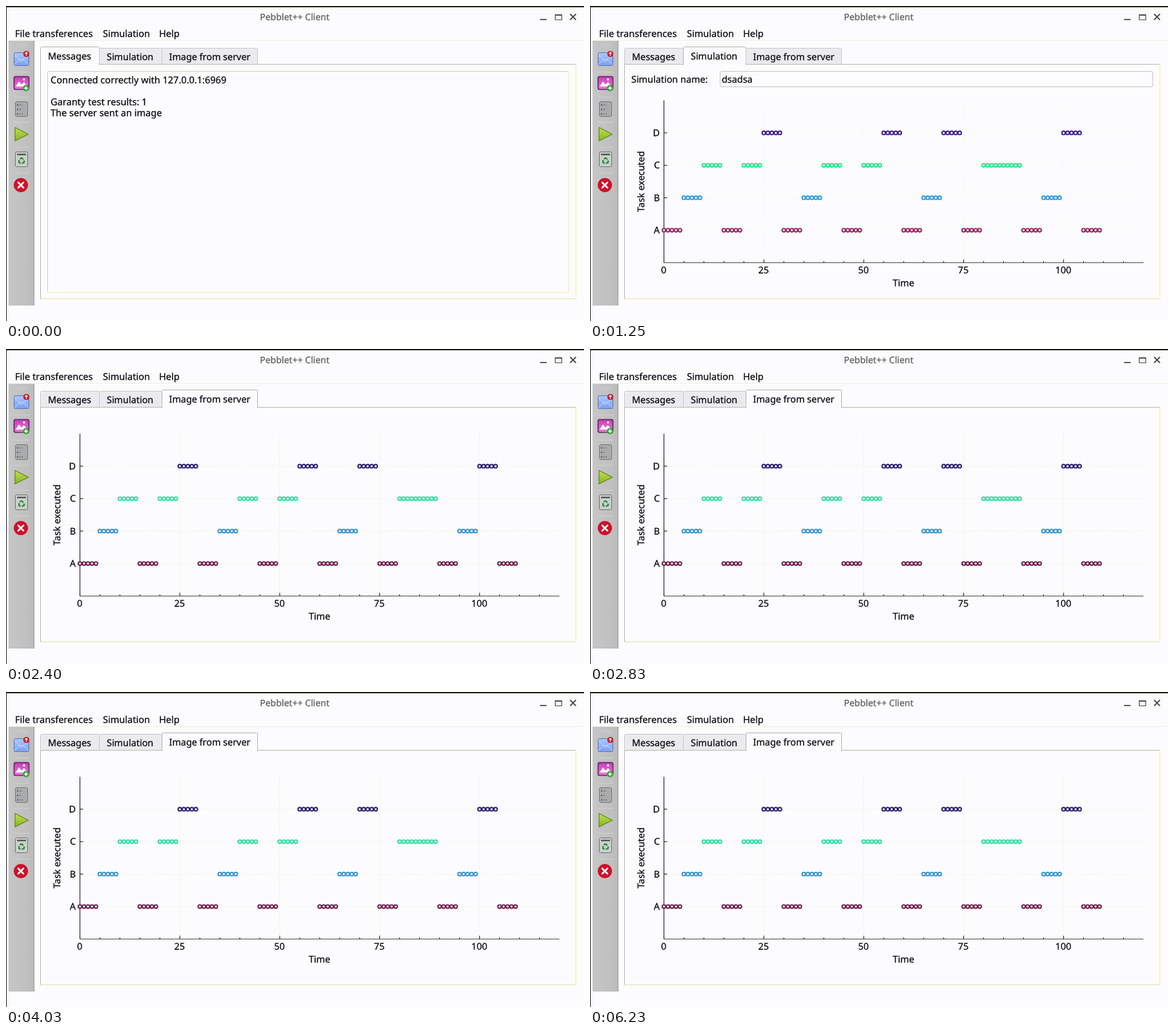
Recreate the animation shown at these times as an HTML page. Size 895 by 489 pixels, loop 6430 ms.

```html
<!DOCTYPE html>
<html lang="en">
<head>
<meta charset="utf-8">
<title>Client window</title>
<style>
  html, body { margin: 0; width: 100%; height: 100%; overflow: hidden; background: #fcfcfe; }
  svg { display: block; width: 895px; height: 489px; }
  text {
    font: 14.4px "Noto Sans", "Open Sans", sans-serif;
    fill: #08080a; stroke: #08080a; stroke-width: .25px;
    text-rendering: geometricPrecision;
  }
  .wide text { font-size: 14.55px; }
  .title { font-size: 14px; fill: #5c5c58; stroke: #5c5c58; }
  .page { display: none; }
  .page.on { display: inline; }
</style>
</head>
<body>
<svg id="stage" viewBox="0 0 895 489">
  <defs>
    <linearGradient id="bar">
      <stop offset="0" stop-color="#c6c6c8"/>
      <stop offset=".7" stop-color="#c0c0c0"/>
      <stop offset="1" stop-color="#bababa"/>
    </linearGradient>
    <linearGradient id="mail" x2="0" y2="1">
      <stop offset="0" stop-color="#a9c8fb"/>
      <stop offset="1" stop-color="#7d9ff0"/>
    </linearGradient>
    <linearGradient id="play" x2="0" y2="1">
      <stop offset="0" stop-color="#c3e052"/>
      <stop offset="1" stop-color="#83b51c"/>
    </linearGradient>
    <linearGradient id="photo" x2="0" y2="1">
      <stop offset="0" stop-color="#c43fb4"/>
      <stop offset="1" stop-color="#f07ad8"/>
    </linearGradient>
  </defs>

  <rect width="895" height="489" fill="#fcfcfe"/>
  <path d="M0 0H895V2H1V489H0Z" fill="#1e1e14"/>

  <!-- title bar and menu -->
  <text class="title" x="447" y="22" text-anchor="middle">Pebblet++ Client</text>
  <g fill="none" stroke="#4c4c48" stroke-width="1.8">
    <path d="M827 21H837"/>
    <path d="M850.5 13.5H860.5V21.5H850.5Z" stroke-width="1.2"/>
    <path d="M850 14H861" stroke-width="2"/>
    <path d="M873.5 12.5L882.5 21.5M882.5 12.5L873.5 21.5"/>
  </g>
  <g class="wide">
    <text x="14" y="48">File transferences</text>
    <text x="150" y="48">Simulation</text>
    <text x="237" y="48">Help</text>
  </g>
  <path d="M4 53.5H892" stroke="#f0f0dc"/>

  <!-- toolbar -->
  <rect x="4" y="54" width="40" height="411" fill="url(#bar)"/>
  <path d="M43.5 54V465" stroke="#9c9c96"/>
  <path d="M17 59.5H34M17 62.5H34" stroke="#e6e6e6" stroke-dasharray="1 2"/>
  <path d="M12 102.5H36M12 141.5H36M12 180.5H36M12 219.5H36M12 259.5H36" stroke="#d2d2d0"/>

  <g stroke-linejoin="round">
    <rect x="12.5" y="72.5" width="23" height="20" rx="2" fill="url(#mail)" stroke="#5676bd"/>
    <path d="M13 91L21 83H27L35 91M13 76L24 86L35 76" fill="none" stroke="#c3d8fd"/>
    <circle cx="31.5" cy="74.5" r="4.8" fill="#d21a2c"/>
    <path d="M31.5 77.5V72M29.5 74L31.5 71.8L33.5 74" fill="none" stroke="#fff" stroke-width="1.2"/>

    <rect x="12.5" y="109.5" width="23" height="20" rx="2.5" fill="url(#photo)" stroke="#662068" stroke-width="1.6"/>
    <path d="M15 125L20 117L24 122L28 118L33 125Z" fill="#fff"/>
    <circle cx="28" cy="114" r="1.8" fill="#fff"/>
    <circle cx="31" cy="127.5" r="5" fill="#39a23c"/>
    <path d="M28 127.5H34M31 124.5V130.5" stroke="#fff" stroke-width="1.6"/>

    <rect x="14.5" y="148.5" width="19" height="23" rx="2.5" fill="#a9aaac" stroke="#747674"/>
    <path d="M17 153.5H19M17 160.5H19M17 167.5H19" stroke="#3c3e42" stroke-width="1.6"/>
    <path d="M21 153.5H25M21 160.5H24M21 167.5H26" stroke="#5c5e66" stroke-dasharray="2 1"/>

    <path d="M14 188.5L34.5 199L14 209.5Z" fill="url(#play)" stroke="#5d841a" stroke-width="1.2"/>

    <rect x="14.5" y="226.5" width="19" height="23" rx="2" fill="#c9cfcb" stroke="#6c726e"/>
    <path d="M17 230.5H31" stroke="#3c423e" stroke-width="2"/>
    <g id="recycle" fill="none" stroke="#218a36" stroke-width="2.2"></g>

    <circle cx="23" cy="278" r="11" fill="#cf1029"/>
    <path d="M19 274L27 282M27 274L19 282" stroke="#fff" stroke-width="2.6" stroke-linecap="round"/>
  </g>

  <!-- tab pane -->
  <path d="M53.5 455V90.5" stroke="#b4b4ac"/>
  <path d="M53.5 90.5H882.5" stroke="#b9b9ae"/>
  <path d="M882.5 90.5V455" stroke="#ececae"/>
  <path d="M53.5 454.5H882.5" stroke="#e2e2b4"/>
  <g id="tabs"></g>

  <g class="page wide">
    <rect x="64.5" y="101.5" width="807" height="343" rx="1" fill="#fcfcfe" stroke="#eeeea8"/>
    <path d="M64.5 102V444M65 101.5H871" stroke="#cfcfb4"/>
    <text x="69" y="120">Connected correctly with 127.0.0.1:6969</text>
    <text x="69" y="154">Garanty test results: 1</text>
    <text x="69" y="171">The server sent an image</text>
  </g>
  <g class="page">
    <text x="64" y="119">Simulation name:</text>
    <rect x="201.5" y="101.5" width="670" height="24" rx="2.5" fill="#fcfcfe" stroke="#c6c6bc"/>
    <text x="204" y="119">dsadsa</text>
    <g id="live"></g>
  </g>
  <g class="page"><g id="still"></g></g>
</svg>

<script>
const $ = id => document.getElementById(id);
const LOOP = 6430;
const STEPS = [[0, 0], [1130, 1], [2400, 2]]; // start time, open tab
const RUNS = "ABCACDABCACDABDACCABDA";        // task run in each 5-unit slot
const TABS = [
  { name: "Messages", x: 53.5, end: 144.5, text: 65 },
  { name: "Simulation", x: 144.5, end: 241.5, text: 156 },
  { name: "Image from server", x: 241.5, end: 389.5, text: 252.5 }
];

const px = t => 114.5 + t * 6.188;
const line = (x1, y1, x2, y2, more = "") =>
  `<path d="M${x1} ${y1}L${x2} ${y2}" ${more}/>`;
const label = (x, y, s, anchor = "middle", more = "") =>
  `<text x="${x}" y="${y}" text-anchor="${anchor}" ${more}>${s}</text>`;

function plot(top, inks, grid) {
  const base = top + 252;
  const rowY = row => base - 50.4 * (row + 1);
  const dots = `stroke="${grid}" stroke-dasharray="1 2"`;
  const axis = 'stroke="#1c1c1c" stroke-width="1.1"';
  let out = "";

  for (let t = 25; t <= 100; t += 25) out += line(px(t), top, px(t), base, dots);
  for (let row = 0; row < 4; row++) out += line(px(0), rowY(row), px(120), rowY(row), dots);

  out += line(px(0), top, px(0), base, axis);
  out += line(px(0), base, px(120), base, 'stroke="#4a4a42"');
  for (let t = 0; t <= 115; t += 5) {
    const major = t % 25 === 0;
    out += line(px(t), base, px(t), base - (major ? 5 : 2.5), axis);
    if (major) out += label(px(t) - .5, base + 16.5, t);
  }
  for (let row = 0; row < 4; row++) {
    out += line(px(0), rowY(row), px(0) + 5, rowY(row), axis);
    out += label(108, rowY(row) + 5, "ABCD"[row], "end");
  }
  out += label(485.5, base + 36.5, "Time");
  out += label(0, 0, "Task executed", "middle", `transform="translate(84 ${top + 126}) rotate(-90)"`);

  [...RUNS].forEach((task, slot) => {
    const row = "ABCD".indexOf(task);
    for (let i = 0; i < 5; i++)
      out += `<circle cx="${px(slot * 5 + i)}" cy="${rowY(row)}" r="2.7" fill="#f4f2f8" stroke="${inks[row]}" stroke-width="1.9"/>`;
  });
  return out;
}

function drawTabs(open) {
  $("tabs").innerHTML = TABS.map((tab, i) => {
    const on = i === open;
    const y = on ? 63.5 : 65.5;
    const foot = on ? 91.5 : 90.5;
    const shape = `M${tab.x} ${foot}V${y + 2}Q${tab.x} ${y} ${tab.x + 2} ${y}H${tab.end - 2}Q${tab.end} ${y} ${tab.end} ${y + 2}V${foot}`;
    return `<path d="${shape}" fill="${on ? "#fcfcfe" : "#ebebef"}" stroke="${on ? "#b4b4a8" : "#c8c8c0"}"/>` +
      (on ? "" : line(tab.x, 90.5, tab.end, 90.5, 'stroke="#b9b9ae"')) +
      label(tab.text, on ? 83 : 84, tab.name, "start");
  }).join("");
}

$("recycle").innerHTML = [0, 120, 240].map(a =>
  `<path d="M-2.6 -3.2L0 -4.6L3 -2.4" transform="translate(24 240.5) rotate(${a})"/>`).join("");
$("live").innerHTML = plot(146.5, ["#96205c", "#2c9de2", "#25e58a", "#3a1d80"], "#f3f3dc");
$("still").innerHTML = plot(131.5, ["#6c1848", "#3a96c8", "#30dea0", "#2c1c6c"], "#e9e9c8");

const pages = document.querySelectorAll(".page");
let shown = -1;

function show(tab) {
  if (tab === shown) return;
  shown = tab;
  drawTabs(tab);
  pages.forEach((page, i) => page.classList.toggle("on", i === tab));
}

const start = performance.now();
function tick() {
  const t = (performance.now() - start) % LOOP;
  show(STEPS.filter(step => step[0] <= t).pop()[1]);
  requestAnimationFrame(tick);
}
tick();
</script>
</body>
</html>
```
